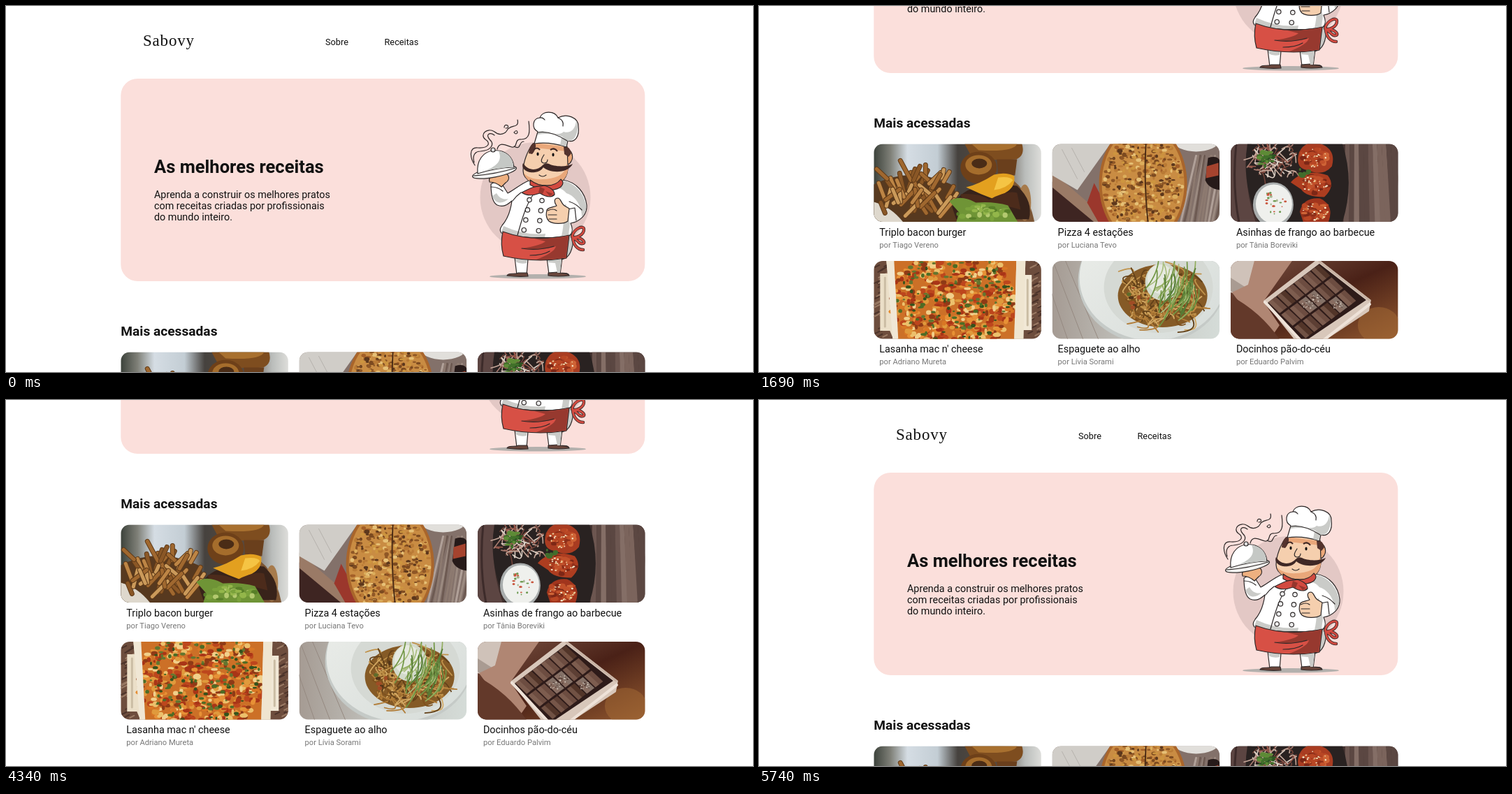
An HTML page that plays this animation: 1069 px wide and 524 px high, repeating every 6970 ms.

```html
<!DOCTYPE html>
<html lang="pt-BR">
<head>
<meta charset="utf-8">
<title>Receitas</title>
<style>
html, body { margin: 0; width: 100%; height: 100%; overflow: hidden; background: #fff; }
#stage { display: block; width: 100%; height: 100%; overflow: hidden; font-family: Roboto, sans-serif; fill: #111; }
.logo { font: 23px "Liberation Serif", serif; letter-spacing: .8px; }
.nav { font-size: 12.77px; }
.hero { font-size: 25.54px; font-weight: 700; }
.lead, .dish { font-size: 14.36px; }
.section { font-size: 19.15px; font-weight: 700; }
.by { font-size: 11.17px; fill: #777; }
.legal { font-size: 12.77px; fill: #999; text-anchor: middle; }
.ink { stroke: #2d2828; stroke-width: 1.2; stroke-linejoin: round; stroke-linecap: round; }
.line { fill: none; }
</style>
</head>
<body>
<svg id="stage" viewBox="0 0 1069 524" preserveAspectRatio="xMinYMin slice">
  <defs>
    <clipPath id="card"><rect width="239.5" height="111.7" rx="12.8"/></clipPath>
    <clipPath id="pie"><ellipse cx="130" cy="57" rx="59" ry="82"/></clipPath>
    <linearGradient id="blur"><stop stop-color="#3c423b"/><stop offset=".1" stop-color="#7f8078"/><stop offset=".2" stop-color="#d5dde4"/><stop offset=".38" stop-color="#c3cdd4"/><stop offset=".5" stop-color="#46423e"/><stop offset=".75" stop-color="#574a40"/><stop offset=".9" stop-color="#b9bcba"/><stop offset="1" stop-color="#dededb"/></linearGradient>
    <linearGradient id="stone"><stop stop-color="#a59b93"/><stop offset=".5" stop-color="#c4c5c0"/><stop offset="1" stop-color="#d5dcd8"/></linearGradient>
    <linearGradient id="warm" x2="1" y2="1"><stop stop-color="#7b5444"/><stop offset=".5" stop-color="#4a2117"/><stop offset="1" stop-color="#93592f"/></linearGradient>
    <linearGradient id="plate" x2="1" y2="1"><stop stop-color="#eceeea"/><stop offset="1" stop-color="#d6dcd9"/></linearGradient>
  </defs>

  <g id="page">
  <text class="logo" x="196" y="57">Sabovy</text>
  <text class="nav" x="457" y="56">Sobre</text>
  <text class="nav" x="541.5" y="56">Receitas</text>

  <rect x="164.3" y="104" width="750" height="290" rx="24" fill="#fbdfdb"/>
  <text class="hero" x="212" y="239">As melhores receitas</text>
  <text class="lead" x="212" y="275">Aprenda a construir os melhores pratos</text>
  <text class="lead" x="212" y="291">com receitas criadas por profissionais</text>
  <text class="lead" x="212" y="307">do mundo inteiro.</text>

  <g id="chef">
    <circle cx="757.5" cy="274" r="79" fill="#e3c8c5"/>
    <ellipse cx="761" cy="387.3" rx="69" ry="3.2" fill="#b3b0ad"/>
    <g class="ink line">
      <path d="M671 228C663 216 663 202 675 203C691 204 694 196 686 191C677 184 689 173 699 180C707 187 715 182 717 178C721 169 735 176 732 163"/>
      <path d="M670 224C667 214 671 208 679 208C694 207 700 198 692 191C686 184 692 180 699 185"/>
      <path d="M703 205C706 193 716 200 724 202C733 203 727 190 737 191C750 191 750 180 748 165M727 201C738 207 733 194 741 194"/>
      <path d="M713 174q0-5 5-3q2 4-3 4M727 181q4-5 5 0q-2 4-5 0"/>
    </g>
    <!-- legs -->
    <g class="ink">
      <path d="M728 360L731 385H745L747 362Z" fill="#fff"/>
      <path d="M774 361L777 384H793L796 360Z" fill="#fff"/>
      <path d="M800 329L812 327C812 346 808 361 795 363Z" fill="#cacbc8"/>
      <path d="M717 386C719 381 728 385 733 382L746 382L747 387Q731 388 717 386Z" fill="#69463c"/>
      <path d="M776 382L789 381C794 384 804 380 806 386Q790 388 776 386Z" fill="#69463c"/>
    </g>
    <path d="M729 362h17l-1 6q-9 2-16-2zM775 363h20l-2 19h-4l-3-14-11-1z" fill="#cacbc8"/>
    <!-- apron bow -->
    <g class="line" stroke-linecap="round">
      <path id="bow" d="M810 330C813 318 827 313 827 320C827 328 816 332 811 331C824 331 830 338 826 340C819 342 818 333 811 332C812 342 818 349 826 349" stroke-width="4.4" stroke="#2d2828"/>
      <path d="M810 330C813 318 827 313 827 320C827 328 816 332 811 331C824 331 830 338 826 340C819 342 818 333 811 332C812 342 818 349 826 349" stroke="#d24a40" stroke-width="2.8"/>
    </g>
    <!-- jacket -->
    <path class="ink" d="M748 250C736 255 728 263 718 268L711 257Q702 249 694 255C694 267 695 281 703 285C712 289 718 284 724 279C722 294 717 306 710 314Q705 321 709 325Q755 336 806 329C812 324 811 318 808 311C820 309 832 300 831 285C829 268 817 252 797 249Z" fill="#fff"/>
    <path d="M797 250C816 254 828 270 830 286C831 292 828 298 824 302C824 286 815 272 802 268Q797 262 791 261ZM801 283C805 295 804 305 807 312L805 328L795 329C798 316 799 303 797 290ZM696 272C701 285 712 283 719 276C712 278 706 275 702 268ZM712 315Q742 329 772 326L771 331Q728 331 709 324Z" fill="#cacbc8"/>
    <path class="ink line" d="M756 268C745 282 738 306 732 328M725 279q5-7 12-12M694 259q10 0 17 6M806 280q10 3 18 12M804 291l10-2 2 18"/>
    <g id="buttons" class="ink" fill="#eee" stroke-width=".9"></g>
    <!-- thumb -->
    <path class="ink" d="M774 292C776 288 784 288 788 286C784 281 784 275 790 275C795 276 794 284 801 287L806 290L804 308C797 313 782 312 777 308C772 303 773 297 774 292Z" fill="#f5cfae"/>
    <path class="ink line" d="M775 293q8-4 13 0M776 299h12M777 305h11" stroke-width=".8"/>
    <!-- tray -->
    <path class="ink" d="M692 252C689 243 700 241 708 240C720 237 723 248 715 253L709 259Q701 252 692 252Z" fill="#eeb080"/>
    <ellipse class="ink" cx="699" cy="238" rx="32" ry="7" transform="rotate(-11 699 238)" fill="#f4f4f2"/>
    <path class="ink" d="M675 240C673 221 683 208 698 207C714 205 726 216 727 231Q704 231 675 240Z" fill="#fff"/>
    <path d="M705 208C719 209 726 219 726 230L688 235C702 229 711 221 705 208Z" fill="#c5c8c5"/>
    <circle class="ink" cx="697" cy="206" r="3" fill="#ddd"/>
    <path class="ink line" d="M669 243Q700 241 729 232"/>
    <!-- head -->
    <path class="ink" d="M797 207C807 199 814 215 809 222C807 227 801 229 798 225Z" fill="#eda979"/>
    <path class="ink" d="M754 197C747 206 740 223 740 236C740 249 757 257 775 257C796 257 805 245 804 228L803 201Q779 192 754 197Z" fill="#f5cfae"/>
    <path d="M802 226C802 240 789 247 770 248C755 249 746 245 741 239C744 252 759 257 776 256C793 256 806 247 804 228ZM757 196L803 202L802 208L758 203Z" fill="#e9a77a"/>
    <path d="M755 196q-7 5-7 15l5 1q6-7 5-14zM798 201q9-1 11 10l-4 5-6-4z" fill="#54332d"/>
    <path d="M769 227C760 237 747 236 740 225C736 233 747 240 757 238Q765 237 769 231C777 239 804 241 811 226C802 231 784 230 777 226Q772 224 769 227Z" fill="#3f2825"/>
    <path class="ink line" d="M770 213C766 219 764 224 770 225Q775 225 775 220M763 242q5 4 10 0"/>
    <path d="M755 206q5-5 9 0M779 206q6-4 10 2" stroke="#3f2825" stroke-width="2.2" class="line"/>
    <ellipse cx="761" cy="212" rx="1.6" ry="2.4"/><ellipse cx="783" cy="213" rx="1.6" ry="2.4"/>
    <!-- hat -->
    <path class="ink" d="M756 197L761 180C752 175 753 161 764 160C767 150 785 149 790 160C803 153 819 160 819 172C821 186 815 196 804 193L802 202Q779 194 756 197Z" fill="#fff"/>
    <path d="M816 164C815 178 806 183 798 180C792 186 778 182 768 179L761 180L761 184Q781 181 796 187L802 193C812 195 818 186 818 173ZM795 188L803 194 801 201 793 199Z" fill="#cacbc8"/>
    <path class="ink line" d="M761 181Q780 178 803 193M790 160Q799 164 797 172M764 160q4-1 7 3"/>
    <!-- scarf -->
    <path class="ink" d="M750 249C764 260 785 260 794 248Q800 253 794 259C784 266 766 265 750 256Z" fill="#d24a40"/>
    <path class="ink" d="M766 258C755 257 747 263 738 267Q748 274 764 268C772 273 780 275 785 270C785 263 777 259 770 257Z" fill="#d24a40"/>
    <path d="M764 259l7 3-3 7-6-2zM772 265l11 4-5 3z" fill="#96362d"/>
    <!-- apron -->
    <path class="ink" d="M711 323Q755 339 806 328L802 361Q757 368 712 358Q707 341 711 323Z" fill="#d75045"/>
    <path d="M756 333Q784 334 805 329L801 360Q781 364 759 363Q785 353 787 344Q770 350 738 347Q765 343 772 337Z" fill="#97392f"/>
    <path class="ink line" d="M738 347q22 4 46-3M750 357q18 0 28-6" stroke-width=".8"/>
  </g>

  <text class="section" x="164.3" y="472">Mais acessadas</text>
  <g id="cards"></g>
  <rect y="859.3" width="1069" height="51" fill="#ededed"/>
  <text class="legal" x="538.7" y="888.5">Todos os direitos reservados, receitas Sabovy.</text>
  </g>
</svg>

<script>
const LOOP = 6970;
// [time in ms, scroll position]
const SCROLL = [
  [0, 0], [920, 6], [1070, 35], [1220, 115], [1390, 199], [1540, 252], [1690, 298], [1860, 319],
  [2320, 327], [2470, 386], [4340, 317], [4490, 294], [4660, 235], [4810, 165], [4970, 95],
  [5120, 67], [5580, 52], [5740, 0]
];

let seed = 7;
const rand = () => (seed = seed * 16807 % 2147483647) / 2147483647;
const spread = (center, radius) => center + (rand() * 2 - 1) * radius;
const pick = list => list[Math.floor(rand() * list.length)];
const many = (count, draw) => Array.from({ length: count }, (_, i) => draw(i)).join('');

const path = (d, fill, extra = '') => `<path d="${d}" fill="${fill}" ${extra}/>`;
const oval = (x, y, rx, ry, fill, extra = '') =>
  `<ellipse cx="${x}" cy="${y}" rx="${rx}" ry="${ry}" fill="${fill}" ${extra}/>`;
const stroke = (d, color, width) =>
  `<path d="${d}" fill="none" stroke="${color}" stroke-width="${width}" stroke-linecap="round"/>`;
const back = fill => `<rect width="240" height="112" fill="${fill}"/>`;

// Random spots inside an oval
const scatter = (count, x, y, rx, ry, size, colors) => many(count, () => {
  const angle = rand() * 2 * Math.PI, reach = Math.sqrt(rand());
  return oval((x + rx * reach * Math.cos(angle)).toFixed(1), (y + ry * reach * Math.sin(angle)).toFixed(1),
    (size * (.5 + rand())).toFixed(1), (size * (.4 + rand() * .7)).toFixed(1), pick(colors));
});

// Random short curves around a point
const strands = (count, x, y, rx, ry, length, width, colors) => many(count, () => {
  const bend = () => spread(0, length).toFixed(1);
  return stroke(`M${spread(x, rx).toFixed(1)} ${spread(y, ry).toFixed(1)}q${bend()} ${bend()} ${bend()} ${bend()}`,
    pick(colors), width);
});

const burger = () => back('url(#blur)') +
  path('M0 58Q55 30 115 60L125 112H0Z', '#57391f') +
  path('M0 83Q25 90 42 112H0Z', '#ded8cd') +
  many(46, () => {
    const x = spread(62, 46), y = 42 + rand() * 62;
    const d = `M${x.toFixed()} ${y.toFixed()}l${spread(2, 20).toFixed()} ${(-12 - rand() * 16).toFixed()}`;
    return stroke(d, '#5f3a18', 7) + stroke(d, pick(['#a0682f', '#bd8545', '#8a5726', '#cb9a5a']), 5);
  }) +
  path('M186 45Q218 55 230 112H180Z', '#7b5534') + oval(216, 84, 9, 26, '#a77b4c') +
  path('M112 90Q130 50 205 60Q229 82 222 108H118Z', '#38231a') +
  path('M130 0H212Q217 16 204 22Q150 26 137 13Z', '#7e4d1f') + path('M140 0H205Q200 12 150 9Z', '#a8702f') +
  oval(150, 34, 26, 23, '#6e4019') + oval(150, 30, 19, 14, '#a56d2c') + oval(151, 28, 11, 7, '#4a2c16') +
  path('M176 22H205L202 45H178Z', '#6a3f1c') +
  path('M132 62Q150 58 172 44Q190 40 201 46Q203 62 188 70L172 79L154 72Z', '#e3a01f') +
  path('M178 48Q196 46 199 52Q190 64 172 66Z', '#f5c444') +
  path('M124 72Q150 70 165 80Q190 66 205 70L210 94Q170 82 130 88Z', '#4c2b1b') +
  path('M108 82Q124 72 146 84Q172 82 192 88L206 112H118L122 98Z', '#6f9436') +
  scatter(30, 158, 99, 38, 11, 4, ['#93b64a', '#587f28', '#b3c96f', '#7ba23c']);

const pizza = () => back('#83716a') +
  path('M0 54L75 112H0Z', '#3e2522') + path('M0 40L84 112H60L0 62Z', '#9a7a66') +
  path('M0 0H83L36 66L0 45Z', '#d0cdc8') + stroke('M14 8L36 50M28 6L46 40', '#b5b1ac', 1) +
  path('M60 56L90 112H66L50 84Z', '#9b372c') +
  many(14, i => stroke(`M${184 + i * 5} 112l${spread(18, 5).toFixed()} -95`, pick(['#8d7a70', '#6d5a52', '#9b8a80', '#b0a098']), 3)) +
  oval(206, -4, 32, 15, '#e1dfdb') +
  oval(130, 57, 63, 86, '#a9652b') + oval(130, 57, 59, 82, '#c98c43') +
  `<g clip-path="url(#pie)">${scatter(520, 130, 57, 56, 74, 2.7,
    ['#7c4a20', '#dcae5c', '#a35f28', '#5c371c', '#cd953f', '#b97a35', '#8f5726', '#e6c076'])}</g>` +
  stroke('M134 0Q131 55 137 112', '#4c2c15', 2) +
  path('M223 20Q236 16 240 24V66Q224 64 219 52Z', '#261a19') + path('M221 32L238 27V45L220 49Z', '#a5432e');

const wings = () => back('#41302e') +
  many(12, i => path(`M${164 + i * 6.5} 0h6.5l${i} 112h-9Z`, pick(['#6c5650', '#7b645c', '#5b4742', '#846e66']))) +
  path('M0 0H30Q14 50 36 112H0Z', '#5c4542') + stroke('M8 0Q2 60 12 112', '#3d2b2a', 3) +
  path('M24 0H160Q178 55 160 112H40Q15 55 24 0Z', '#292221') +
  strands(75, 60, 26, 30, 22, 15, 1.6, ['#c4a698', '#a87c70', '#ddd0c5', '#96584b', '#704238']) +
  scatter(26, 51, 21, 11, 11, 3.5, ['#41702a', '#5d8b36', '#2c5522']) +
  oval(61, 87, 29, 32, '#a9adad') + oval(62, 86, 26, 28, '#eff0ed') +
  scatter(22, 62, 84, 17, 17, 1.8, ['#6d9a52', '#c9573f', '#a5b58e']) +
  path('M98 12Q108 -8 132 1Q151 10 145 32Q132 47 112 38Q91 36 98 12Z', '#a93c21') +
  path('M86 55Q105 34 139 45Q151 60 134 76Q108 76 101 65Z', '#ad3d20') +
  path('M99 97Q104 76 128 78Q149 88 140 112H104Z', '#a1351d') +
  [[120, 20], [120, 58], [122, 96]].map(([x, y]) =>
    scatter(30, x, y, 20, 13, 4, ['#cf6436', '#b84624', '#7d2716', '#8f301a', '#c2512b']) +
    scatter(20, x, y, 18, 13, 1.2, ['#f0dba6', '#f8edcf'])).join('') +
  scatter(9, 105, 40, 7, 6, 3, ['#416d2c']);

const lasagna = () => back('#6d4d3d') +
  many(90, () => stroke(`M${pick([0, 221]) + rand() * 18 | 0} ${rand() * 112 | 0}l6 -3`, pick(['#9b7b65', '#4b332a']), 2)) +
  path('M18 0H217L214 112H28L23 100H9V18H20Z', '#ebdfc8') + path('M215 20H226V99H213Z', '#f1e8d6') +
  stroke('M16 24V94M220 27V92', '#cbbda4', 3) +
  path('M27 0H204L201 112H34Z', '#cc7027') +
  scatter(620, 115, 56, 92, 72, 4, ['#e09a3c', '#bd461d', '#ecc06c', '#d97725', '#a93517', '#e79136', '#8f3a16', '#f1cf8a']) +
  scatter(150, 115, 53, 85, 65, 2.6, ['#4e6c25', '#34521c', '#63762f']) +
  path('M204 0H217L214 112H201Z', '#efe5d0') + path('M18 0H29L35 112H27Z', '#f0e7d5');

const spaghetti = () => back('url(#stone)') +
  many(4, i => stroke(`M${i * 18 - 35} 0L${i * 22} 112`, '#958980', 1)) +
  oval(143, 28, 106, 91, '#c5cac7') + oval(144, 24, 105, 90, 'url(#plate)') + oval(152, 38, 78, 65, '#d5d9d4') +
  oval(158, 50, 64, 45, '#855a26') +
  strands(190, 158, 53, 48, 31, 24, 1.8, ['#b27d38', '#d2a863', '#7e501c', '#c0924a', '#634119']) +
  scatter(26, 157, 55, 49, 32, 3, ['#a04c25', '#5f6c2b', '#533519']) +
  oval(158, 30, 25, 27, '#d3dacb') + oval(155, 26, 19, 21, '#e6e9e0') +
  many(40, () => stroke(`M${spread(182, 34).toFixed()} ${spread(22, 22).toFixed()}q${spread(4, 12).toFixed()} 22 ${spread(-16, 14).toFixed()} ${spread(40, 12).toFixed()}`,
    pick(['#719644', '#91ac5d', '#567c36', '#a9bd7e']), 1.7));

const chocolates = () => back('url(#warm)') +
  path('M0 0H34L39 36L20 52L0 45Z', '#cfc2b9') + path('M0 24L25 40L15 52L0 43Z', '#a99b92') +
  path('M34 0H88L47 58L70 92L61 105Q25 78 2 45L25 34Z', '#b08673') +
  path('M0 50Q42 72 70 112H0Z', '#63392a') + oval(212, 92, 30, 26, '#a56c37', 'opacity=".5"') +
  path('M47 57L125 -3L201 56L198 72L124 121H98Z', '#d8c7ba') +
  path('M53 60L127 4L194 56L105 116Z', '#2e1b19') +
  many(18, i => {
    const col = i % 6, row = i / 6 | 0;
    const x = 54 + col * 12.3 + row * 18.5, y = 59 - col * 9.1 + row * 18;
    const nutty = col === 2 + row && row > 0 || i === 8;
    return path(`M${x} ${y}l10.5 -7.8 16.5 15.5 -11 8.2Z`, nutty ? '#857268' : pick(['#5d3f34', '#6d4d41', '#523529'])) +
      path(`M${x} ${y}l5 -3.7 16.5 15.5 -5 4Z`, '#8b6a5c', 'opacity=".55"') +
      (nutty ? scatter(16, x + 13, y + 4, 8, 6, 1.1, ['#cfc3b8', '#4c352e']) : '');
  }) +
  stroke('M49 59L102 116M199 62L126 119', '#eee2d8', 4) + stroke('M127 1L198 56', '#c9b3a4', 3);

const CARDS = [
  [burger, 'Triplo bacon burger', 'Tiago Vereno'],
  [pizza, 'Pizza 4 estações', 'Luciana Tevo'],
  [wings, 'Asinhas de frango ao barbecue', 'Tânia Boreviki'],
  [lasagna, "Lasanha mac n' cheese", 'Adriano Mureta'],
  [spaghetti, 'Espaguete ao alho', 'Lívia Sorami'],
  [chocolates, 'Docinhos pão-do-céu', 'Eduardo Palvim']
];

document.getElementById('cards').innerHTML = CARDS.map(([photo, dish, author], i) => `
  <g transform="translate(${164.3 + i % 3 * 255.3} ${495.4 + (i / 3 | 0) * 167.5})">
    <g clip-path="url(#card)">${photo()}</g>
    <text class="dish" x="8" y="131.6">${dish}</text>
    <text class="by" x="8" y="148.4">por ${author}</text>
  </g>`).join('');

document.getElementById('buttons').innerHTML = many(8, i => {
  const row = i / 2 | 0, right = i % 2;
  return `<circle cx="${749 - row * 2.6 + right * (18 + row)}" cy="${277.5 + row * 14.4 + right}" r="3.2"/>`;
});

const frames = SCROLL.map(([time, y]) =>
  ({ offset: time / LOOP, transform: `translateY(${-y}px)`, easing: 'steps(1, end)' }));
frames.push({ offset: 1, transform: 'translateY(0px)' });
document.getElementById('page').animate(frames, { duration: LOOP, iterations: Infinity });
</script>
</body>
</html>
```
